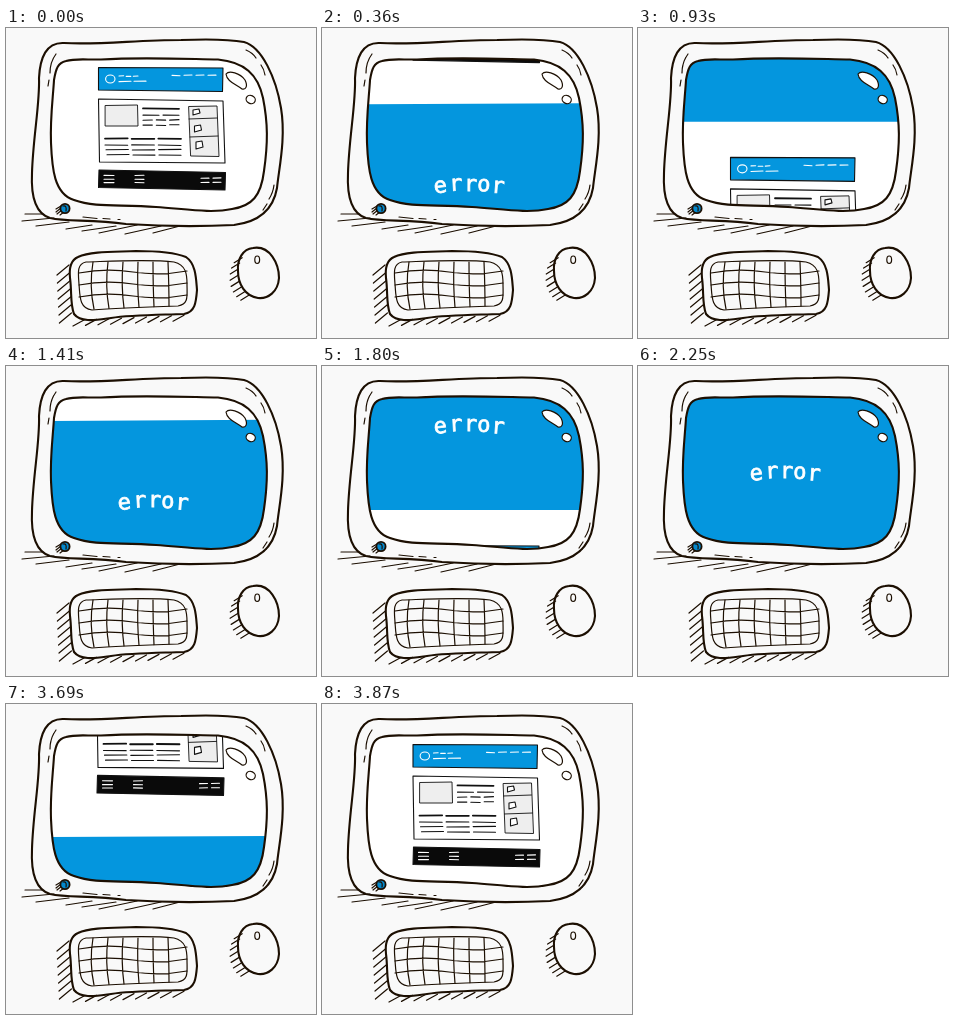
Write an HTML page that moves like this. It is 310 px wide and 310 px high and loops after 3900 ms.

```html
<!DOCTYPE html>
<html lang="en">
<head>
<meta charset="utf-8">
<title>Screen error</title>
<style>
html, body { margin: 0; width: 100%; height: 100%; overflow: hidden; background: #f9f9f9; }
svg { display: block; width: 100%; height: 100%; }
.ink, .page { fill: none; stroke: #1c0f02; stroke-linecap: round; stroke-linejoin: round; }
.page { stroke: #111; stroke-width: 1.1; }
text { font: 22px "DejaVu Sans Mono", monospace; fill: #fff; stroke: #fff; stroke-width: .8; }
</style>
</head>
<body>
<svg viewBox="0 0 310 310">
  <defs>
    <path id="screen" d="M60 33C70 30 82 32 95 31.500C135 29 180 31 212 31.500C238 34 252 46 257 70C262 95 262 115 258 143C255 168 246 178 226 181C205 185.500 180 181 150 179C115 176 90 180 68 172C48 166 46 140 45 115C44 90 47 70 48 52C50 40 52 35 60 33Z"/>
    <clipPath id="glass"><use href="#screen"/></clipPath>
    <g id="page" class="page">
      <path d="M92.500 39.500L217 40L216.500 63.500L92.500 62Z" fill="#0496de"/>
      <path d="M92.500 71L217 73L219 135L93.500 134Z" fill="#fff"/>
      <path d="M93 142L219.500 144.500L219 162L92.500 159.500Z" fill="#0a0a0a"/>
      <path d="M99.500 77.500L131.500 77L132 98L99.500 98ZM183 78.500L211 78L213 128.500L185 128ZM183 91l28-1M184 109l28-1" fill="#eee" stroke-width=".9"/>
      <path id="icons" fill="#fff"/>
      <path id="heads" stroke-width="1.800"/>
      <path id="copy"/>
      <g stroke="#fff">
        <ellipse cx="104.300" cy="51" rx="4.700" ry="4"/>
        <path id="labels"/>
      </g>
    </g>
  </defs>

  <path id="hatch" class="ink" stroke-width="1.200"/>

  <use href="#screen" fill="#fff"/>
  <g clip-path="url(#glass)">
    <g id="strip">
      <use href="#page" x="-1.500" y="-178"/>
      <path d="M30 25.700L275 24.500V191H30Z" fill="#0496de"/>
      <text x="112.500 127.500 142 155 169" y="115 112.500 112 112.500 114" rotate="-7 -3 0 2 4">error</text>
      <use href="#page" y="187"/>
    </g>
  </g>

  <g class="ink" stroke-width="2.100">
    <path d="M58 15C95 17 130 12 175 12C200 11 222 11 238 14C256 19 270 50 275 80C280 110 273 140 271 160C267 183 252 194 228 197C190 199 150 198 120 196C85 191 62 194 44 190C28 185 25 165 26 145C27 110 34 75 33 50C34 30 40 14 58 15Z"/>
    <use href="#screen"/>
    <path d="M72 229C85 223 110 224 130 223C155 223 170 225 180 229C190 236 190 250 191 262C190 275 189 284 178 286C150 287 125 287 105 290C90 292 75 295 68 286C64 275 66 265 64 250C63 240 65 232 72 229Z"/>
    <path d="M247 220C264 217 273 236 273 250C272 264 262 271 252 270C239 268 232 256 232 243C231 231 237 221 247 220Z"/>
  </g>
  <g class="ink" stroke-width="1.200">
    <g fill="#fff">
      <path d="M220 46C223 42 234 45 239 52C242 58 240 62 236 61C230 56 221 54 220 46Z"/>
      <ellipse cx="244.700" cy="71.500" rx="4.700" ry="4" transform="rotate(25 244.700 71.500)"/>
    </g>
    <path d="M50 26Q44 34 44 45M43 52L42 58M240 22Q247 25 250 30M255 37Q258 41 259 47M268 157Q267 165 263 171M261 176L257 182M77 189L91 190.500M97 190.500L104 191M112 191.500h2"/>
    <path d="M55 178l-5 3M55 180l-5 4M56 182l-5 4M58 184l-4 3"/>
    <circle cx="59" cy="180.500" r="4.600" fill="#0488cc" stroke-width="1.800"/>
    <path d="M57 178q4-1 3 5"/>
    <path d="M80 234C110 233 145 231 168 234C180 237 181 246 181 256C181 268 183 276 172 278C140 279 110 280 86 282C73 280 74 268 73 256C72 244 71 236 80 234Z"/>
    <path id="grid"/>
    <ellipse cx="251.200" cy="231.700" rx="2.400" ry="3.700"/>
  </g>
</svg>
<script>
const $ = id => document.getElementById(id);
const setPath = (id, d) => $(id).setAttribute("d", d);
const repeat = (n, f) => Array.from({ length: n }, (_, i) => f(i)).join("");

let seed = 7;
const rand = () => (seed = seed * 16807 % 2147483647) / 2147483647;
const jitter = size => (rand() - .5) * size;

// A line of unreadable writing, broken into dashes
function scribble(x, y, width, dashes, gap = 4) {
  const w = (width - gap * (dashes - 1)) / dashes;
  return repeat(dashes, i => `M${x + i * (w + gap)} ${y + jitter(.6)}l${w} ${jitter(1)}`);
}

function drawPage() {
  setPath("heads", scribble(137, 80.7, 36, 1) + scribble(99, 110.7, 76, 3));
  setPath("copy",
    repeat(3, i => scribble(137, 87 + i * 5, 36, 2 + (i > 0))) +
    repeat(3, i => scribble(99 + i, 116.8 + i * 5, 76 - i, 3)));
  setPath("labels",
    scribble(113, 48.3, 19, 3, 2.5) + scribble(113, 53.4, 27, 2, 3) +
    scribble(166, 47.3, 44, 4) +
    repeat(3, i => scribble(98, 147.5 + i * 3.5, 10, 1) + scribble(129, 147.5 + i * 3.5, 9, 1)) +
    repeat(2, i => scribble(195, 150 + i * 4.5, 20, 2)));
  setPath("icons", repeat(3, i => `M${187 + i * 1.5} ${82 + i * 16}l6-1 1 ${4 + i} -7 2Z`));
}

function drawKeys() {
  setPath("grid",
    repeat(6, i => `M${87 + i * 15} 234q${i - 4} 24 1 ${47 - i * .6}`) +
    repeat(3, i => `M73 ${245 + i * 12}q27 -5 54 -1t54 -1`));
}

function drawHatch() {
  const ground = "M19 186h17M16 193l32-3M30 198l33-4M60 201l26-4M76 203l34-5M93 205l38-8M119 206l36-8M147 205l27-7";
  const board =
    repeat(7, i => `M${63 + i * .4} ${237 + i * 8}l-12 10`) +
    repeat(9, i => `M${78 + i * 12.5} ${292 - i * .6}l-11 6`);
  const mouse = repeat(8, i => {
    const a = 3.8 - i * .25;
    return `M${252 + 20 * Math.cos(a)} ${245 + 25 * Math.sin(a)}l-8 5`;
  });
  setPath("hatch", ground + board + mouse);
}

// The picture rolls in even linear swings, rests, then rolls on to the page
const SWINGS = [-187, 110, -107, 41, -47, 0];
const SWING = 450, REST_END = 3420, ROLL_END = 3870, ROLL = 179;
const LOOP = 3900, STEP = 30;

function offset(t) {
  if (t >= REST_END) return ROLL * Math.min(1, (t - REST_END) / (ROLL_END - REST_END));
  const i = Math.floor(t / SWING), u = t / SWING - i;
  if (i >= SWINGS.length - 1) return 0;
  return SWINGS[i] + (SWINGS[i + 1] - SWINGS[i]) * u;
}

const start = performance.now();
function draw() {
  const t = Math.max(0, performance.now() - start) % LOOP;
  const y = offset(Math.floor(t / STEP) * STEP);
  $("strip").setAttribute("transform", `translate(0 ${y.toFixed(2)})`);
  requestAnimationFrame(draw);
}

drawPage();
drawKeys();
drawHatch();
draw();
</script>
</body>
</html>
```
